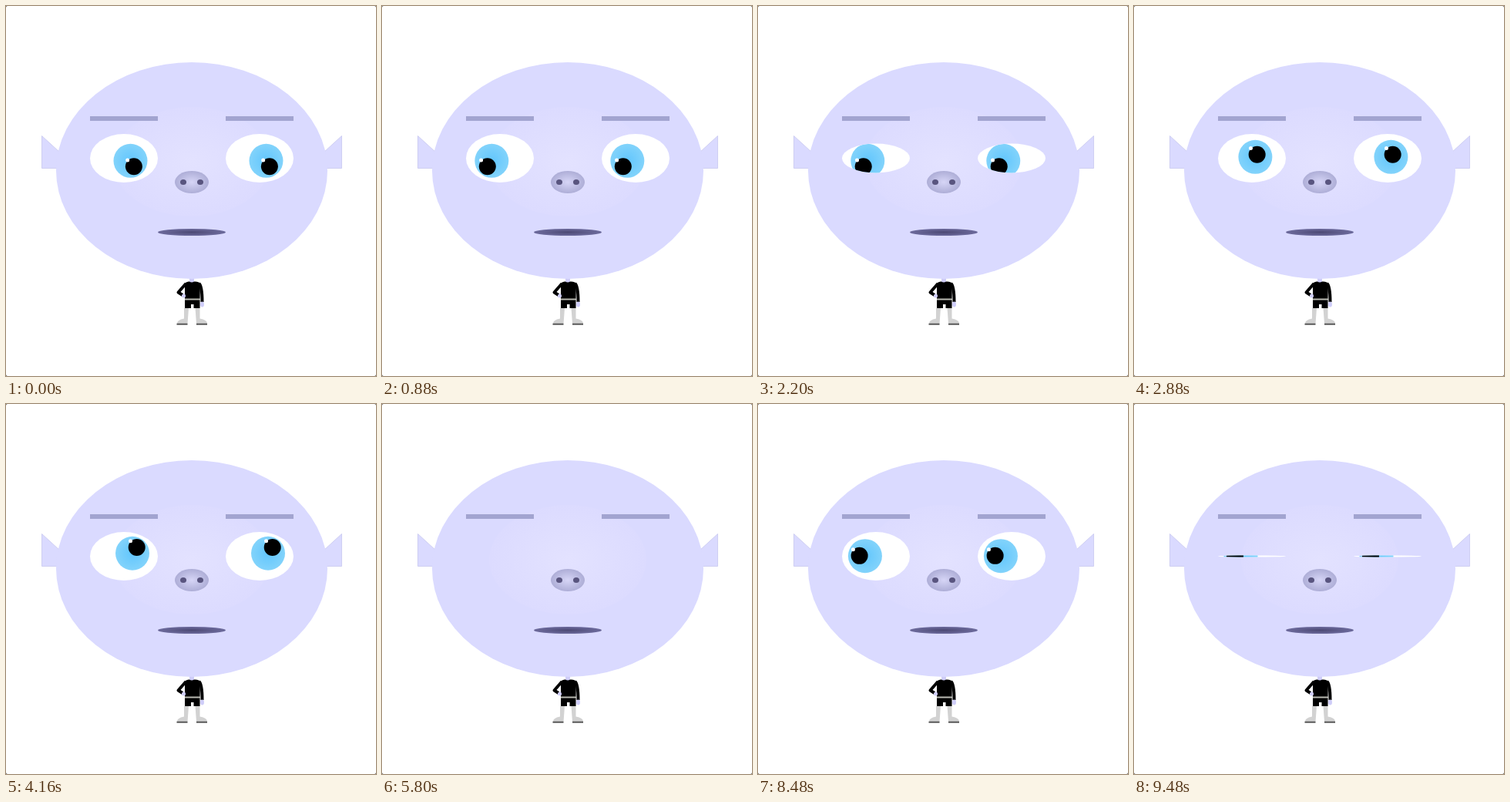
Animation of 480x480 px, one loop 9520 ms. Source, as an HTML page:

```html
<!DOCTYPE html>
<html lang="en">
<head>
<meta charset="utf-8">
<title>Big head looking around</title>
<style>
  html, body { margin: 0; width: 100%; height: 100%; overflow: hidden; background: #444; }
  svg { display: block; width: 100vw; height: 100vh; background: #fff; border-radius: 2px; }
</style>
</head>
<body>
<svg viewBox="0 0 480 480">
  <defs>
    <radialGradient id="glow">
      <stop offset="0" stop-color="#e3e2ff"/>
      <stop offset="1" stop-color="#dcdbff"/>
    </radialGradient>
    <radialGradient id="irisFill">
      <stop offset="0" stop-color="#62c6fd"/>
      <stop offset="1" stop-color="#82d3fb"/>
    </radialGradient>
    <radialGradient id="noseFill">
      <stop offset="0" stop-color="#d6d5f6"/>
      <stop offset="1" stop-color="#aeaed7"/>
    </radialGradient>
    <radialGradient id="mouthFill">
      <stop offset="0" stop-color="#4c4974"/>
      <stop offset="1" stop-color="#6c6a9c"/>
    </radialGradient>
    <clipPath id="lids"><ellipse id="lid" cx="153" cy="197.5" rx="44" ry="31.5"/></clipPath>
    <path id="ear" d="M46.5 168.500L70 190V210.500H46.500Z" fill="#dadaff" stroke="#cfcff2"/>
  </defs>

  <!-- body -->
  <g fill="none" stroke="#000" stroke-width="4" stroke-linejoin="round">
    <path d="M238 353h6v6h-6z" fill="#cfcdf8" stroke="none"/>
    <path d="M233.500 360L223.500 371.500L229 375"/>
    <path d="M250.500 360Q254.500 364 254.500 384"/>
    <path d="M232 360Q234 357 238 357.500Q241 359.500 244 357.500Q250 357 252 360L251.500 380H232Z" fill="#000" stroke="none"/>
    <path d="M232 381H251.500V392H243.500V387H240V392H232Z" fill="#000" stroke="none"/>
    <path d="M232 380.500H251.500" stroke="#b9bab2" stroke-width="2"/>
    <g fill="#cfcdf8" stroke="none">
      <circle cx="230.500" cy="376" r="2.500"/>
      <ellipse cx="254.500" cy="387" rx="2.500" ry="3.500"/>
    </g>
    <g fill="#d2d2d2" stroke="none">
      <path d="M231 392H237L235.500 412H222Q222 407 231 405.500Z"/>
      <path d="M245.500 392H251.500V405.500Q261 407 261 412H247Z"/>
      <path d="M221.500 411.800h14v2h-14zM247 411.800h14v2h-14z" fill="#585858"/>
    </g>
  </g>

  <!-- head -->
  <use href="#ear"/>
  <use href="#ear" transform="matrix(-1 0 0 1 482 0)"/>
  <ellipse cx="241" cy="213.500" rx="176" ry="140.500" fill="#dadaff"/>
  <ellipse cx="241" cy="202" rx="102" ry="71" fill="url(#glow)"/>
  <path d="M109 143h88v6h-88zM285 143h88v6h-88z" fill="#a2a4d0"/>

  <g id="eye">
    <g clip-path="url(#lids)">
      <rect x="108" y="165" width="90" height="65" fill="#fff"/>
      <circle id="iris" r="22" fill="url(#irisFill)"/>
      <g id="pupil">
        <circle r="11"/>
        <circle cx="-8.200" cy="-8.200" r="2.500" fill="#fff"/>
      </g>
    </g>
  </g>
  <use href="#eye" x="176"/>

  <ellipse cx="241" cy="228.500" rx="22" ry="14.500" fill="url(#noseFill)"/>
  <g fill="#59557f">
    <ellipse cx="230" cy="228.500" rx="4" ry="3.500"/>
    <ellipse cx="252" cy="228.500" rx="4" ry="3.500"/>
  </g>
  <ellipse cx="241" cy="293.500" rx="44" ry="4.500" fill="url(#mouthFill)"/>
</svg>

<script>
const LOOP = 9520, STEP = 40;
const LOOK_EVERY = 2760, LOOK_START = -48;
const BLINK_HALF = 400, BLINKS = [2120, 5800, 9480.2];

// Gaze directions: down right, down left, up right, up, left
const GAZES = [[.74, .7], [-.74, .7], [.76, -.72], [0, -1], [-1, 0]];

const [lid, iris, pupil] = ['lid', 'iris', 'pupil'].map(id => document.getElementById(id));

// Slightly bouncy damped spring from 0 to 1
function spring(ms) {
  const damping = .6, speed = 10.6, s = ms / 1000;
  const root = Math.sqrt(1 - damping * damping), angle = speed * root * s;
  return 1 - Math.exp(-damping * speed * s) * (Math.cos(angle) + damping / root * Math.sin(angle));
}

// 1 is wide open, 0 is shut; circular easing on both sides
function openness(t) {
  const gap = Math.min(...BLINKS.map(b => Math.abs(t - b)));
  const p = Math.min(1, gap / BLINK_HALF);
  return Math.sqrt(1 - (1 - p) ** 2);
}

function gazeAt(t) {
  const since = t - LOOK_START, i = Math.floor(since / LOOK_EVERY);
  const k = spring(since - i * LOOK_EVERY);
  return GAZES[i].map((from, axis) => from + (GAZES[i + 1][axis] - from) * k);
}

function place(el, x, y) {
  el.setAttribute('transform', `translate(${153 + x} ${197.3 + y})`);
}

function draw(t) {
  const [x, y] = gazeAt(t);
  place(iris, 14.5 * x, 5 * y);
  place(pupil, 22 * x, 15.6 * y);
  lid.setAttribute('ry', 31.5 * openness(t));
}

const start = performance.now();
function frame(now) {
  const t = Math.max(0, now - start) % LOOP;
  draw(Math.floor(t / STEP) * STEP);
  requestAnimationFrame(frame);
}
draw(0);
requestAnimationFrame(frame);
</script>
</body>
</html>
```
